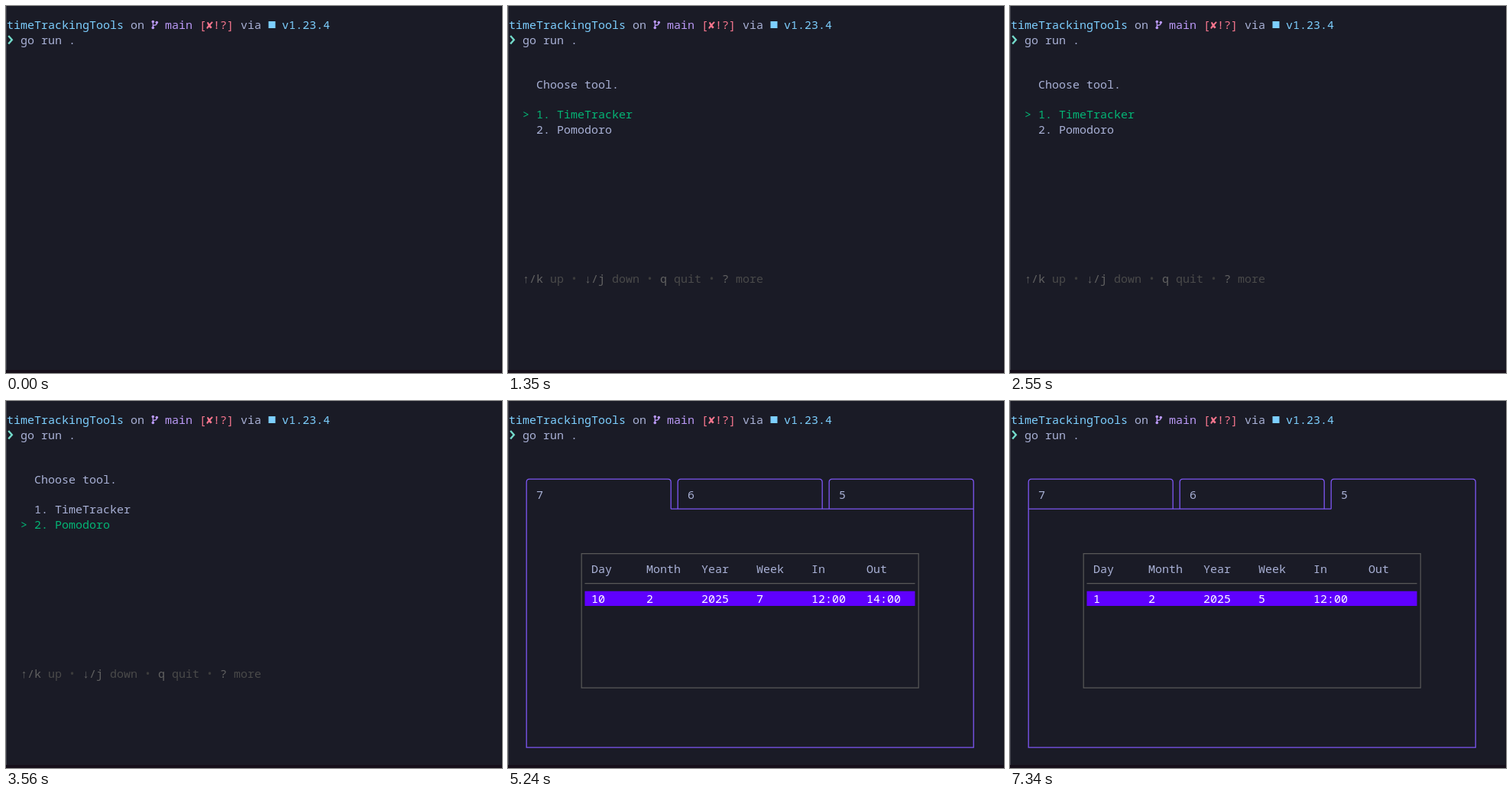
These frames come from a looping animation (649x480 px, 8 s). An HTML page:

```html
<!DOCTYPE html>
<html lang="en">
<head>
<meta charset="utf-8">
<title>Terminal time tracker</title>
<style>
  html, body { margin: 0; width: 100%; height: 100%; overflow: hidden; background: #1a1b26; }
  svg { display: block; width: 649px; height: 480px; }
  text { font: 15px "Noto Sans Mono", "DejaVu Sans Mono", monospace; white-space: pre; }
</style>
</head>
<body>
<svg id="stage" viewBox="0 0 649 480"></svg>
<script>
const CELL_W = 9, ROW_H = 19.5, LOOP = 8000;
const C = {
  fg: '#a9b1d6', blue: '#7dcfff', purple: '#bb9af7', red: '#f7768e', mint: '#73daca',
  cursor: '#c0caf5', green: '#04b575', key: '#626262', desc: '#4a4a4a', dot: '#3c3c3c',
  tab: '#7d56f4', grid: '#585858', select: '#5f00ff'
};
const stage = document.getElementById('stage');

function add(parent, tag, attrs = {}) {
  const el = document.createElementNS('http://www.w3.org/2000/svg', tag);
  for (const name in attrs) el.setAttribute(name, attrs[name]);
  return parent.appendChild(el);
}

function write(parent, col, row, string, fill = C.fg, weight = 400) {
  add(parent, 'text', {
    x: 1 + col * CELL_W, y: 30 + (row - 1) * ROW_H, fill, 'font-weight': weight
  }).textContent = string;
}

const box = (parent, x, y, width, height, fill) =>
  add(parent, 'rect', { x, y, width, height, fill });

const line = (parent, d, stroke, width) =>
  add(parent, 'path', { d, stroke, fill: 'none', 'stroke-width': width });

// Centre of a character cell, where box-drawing lines run.
const cx = col => 6.2 + col * CELL_W;
const cy = row => 24.2 + (row - 1) * ROW_H;

function drawShell() {
  box(stage, 0, 0, 649, 480, '#1a1b26');
  box(stage, 0, 0, 1, 476, '#41424b');
  box(stage, 0, 476, 649, 4, '#160f1a');
  box(stage, 648, 0, 1, 476, '#15151e');

  write(stage, 0, 1, 'timeTrackingTools', C.blue, 600);
  write(stage, 18, 1, 'on');
  write(stage, 23, 1, 'main', C.purple, 600);
  write(stage, 28, 1, '[', C.red, 600);
  write(stage, 29, 1, '✘', C.red, 600);
  write(stage, 30, 1, '!?]', C.red, 600);
  write(stage, 34, 1, 'via');
  write(stage, 40, 1, 'v1.23.4', C.blue, 600);
  write(stage, 2, 2, 'go run .');

  line(stage, 'M192.3 20.5V28.5M197.3 21.5V22.5Q197.3 25 194.5 25Q192.3 25 192.3 27', C.purple, 1.3);
  for (const [x, y] of [[192.3, 20.5], [197.3, 21.5], [192.3, 28.5]])
    add(stage, 'circle', { cx: x, cy: y, r: 1.8, fill: C.purple });
  box(stage, 343.5, 20, 9, 9, C.blue);
  line(stage, 'M3.2 39L7.8 44.2L3.2 49.5', C.mint, 2.4);
}

function drawMenu(selected) {
  const g = add(stage, 'g');
  write(g, 4, 5, 'Choose tool.');
  ['TimeTracker', 'Pomodoro'].forEach((name, i) => {
    const on = i === selected;
    write(g, 2, 7 + i, `${on ? '>' : ' '} ${i + 1}. ${name}`, on ? C.green : C.fg);
  });
  const help = [['↑/k', 'up'], ['↓/j', 'down'], ['q', 'quit'], ['?', 'more']];
  let col = 2;
  help.forEach(([key, desc], i) => {
    if (i) {
      write(g, col, 18, '•', C.dot);
      col += 2;
    }
    write(g, col, 18, key, C.key);
    col += key.length + 1;
    write(g, col, 18, desc, C.desc);
    col += desc.length + 1;
  });
  return g;
}

function drawTabs(active, entry) {
  const g = add(stage, 'g');
  const top = cy(5), base = cy(7), bottom = cy(23), left = cx(2), right = cx(67);
  let d = `M${left} ${base}V${bottom}H${right}V${base}`;
  ['7', '6', '5'].forEach((week, i) => {
    const a = cx(2 + 22 * i), b = cx(23 + 22 * i);
    d += `M${a} ${base}V${top + 4}q0-4 4-4H${b - 4}q4 0 4 4V${base}`;
    if (i !== active) d += `M${a} ${base}H${b}`;
    if (i < 2) d += `M${b} ${base}H${cx(24 + 22 * i)}`;
    write(g, 4 + 22 * i, 6, week);
  });
  line(g, d, C.tab, 1.3);

  line(g, `M${cx(10)} ${cy(10)}H${cx(59)}V${cy(19)}H${cx(10)}Z`, C.grid, 1.2);
  line(g, `M100.5 ${cy(12)}H532.5`, C.grid, 1.2);
  box(g, 100.5, 248.7, 432, 19.3, C.select);
  ['Day', 'Month', 'Year', 'Week', 'In', 'Out'].forEach((name, i) => {
    write(g, 12 + 8 * i, 11, name);
    write(g, 12 + 8 * i, 13, entry[i] || '', '#fff');
  });
  return g;
}

drawShell();
const idle = add(stage, 'g');
const cursor = add(stage, 'g');
box(cursor, 1, 53.5, 9.5, 19.5, C.cursor);
const tracker = drawMenu(0), pomodoro = drawMenu(1);
const weeks = [
  ['10', '2', '2025', '7', '12:00', '14:00'],
  ['9', '2', '2025', '6', '12:00'],
  ['1', '2', '2025', '5', '12:00']
].map((entry, i) => drawTabs(i, entry));

const steps = [
  [0, idle], [270, cursor], [810, idle], [1290, cursor],
  [1350, tracker], [2130, pomodoro], [2550, tracker], [3560, pomodoro], [4280, tracker],
  [5240, weeks[0]], [6740, weeks[1]], [7340, weeks[2]]
];
const screens = new Set(steps.map(step => step[1]));
const start = performance.now();

function render() {
  const time = (performance.now() - start) % LOOP;
  const current = steps.filter(([at]) => at <= time).pop()[1];
  for (const screen of screens) screen.style.display = screen === current ? '' : 'none';
  requestAnimationFrame(render);
}
render();
</script>
</body>
</html>
```
